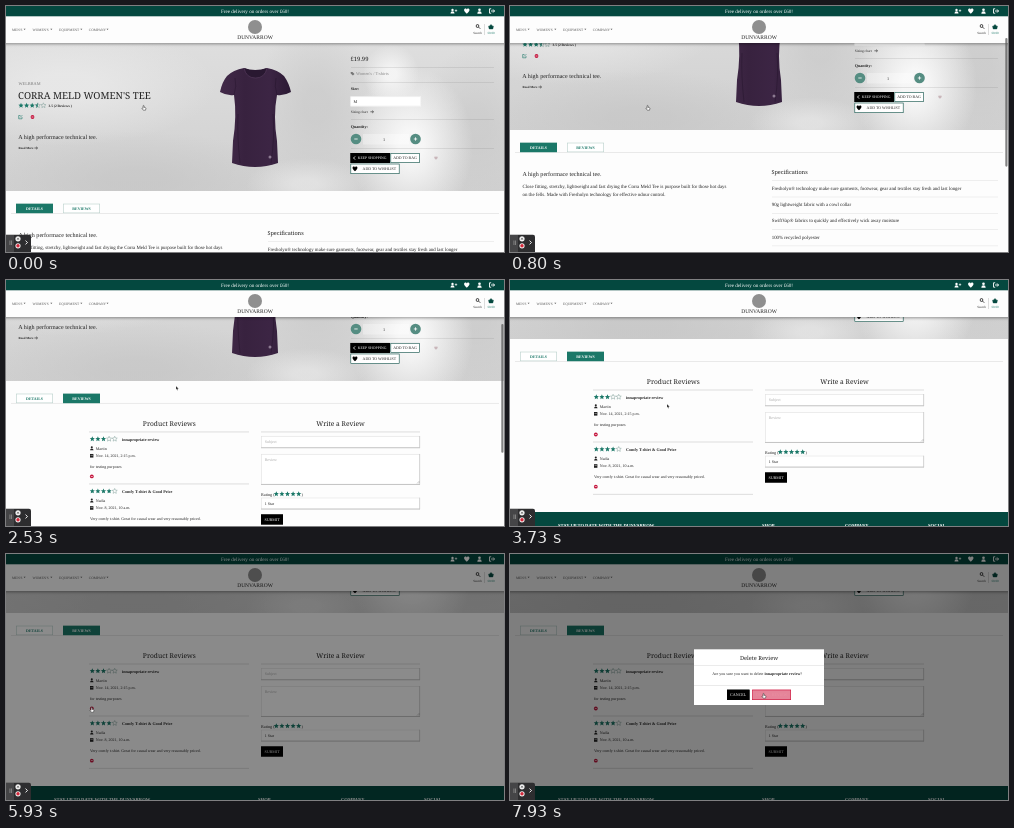
These frames come from a looping animation (498 px wide and 246 px high, 8 s). An HTML page with a canvas:

```html
<!DOCTYPE html>
<html lang="en">
<head>
<meta charset="utf-8">
<title>Product page</title>
<style>
html, body { margin: 0; width: 100%; height: 100%; overflow: hidden; background: #fff; }
canvas { display: block; width: 498px; height: 246px; }
</style>
</head>
<body>
<canvas id="stage"></canvas>
<script>
const W = 498, H = 246, LOOP = 8000, STEP = 1000 / 15;
const PAGE_HEIGHT = 470, REVIEWS_TOP = 126;
const GREEN = '#04483f', TEAL = '#1b7868', RED = '#c4143c', INK = '#222', RULE = '#d9d9d9';
const BODY = '"Liberation Serif", serif', HEAD = '"Noto Serif", serif';

const canvas = document.getElementById('stage');
const ctx = canvas.getContext('2d');
const dpr = window.devicePixelRatio || 1;
canvas.width = W * dpr;
canvas.height = H * dpr;
ctx.textRendering = 'geometricPrecision';

// Keyframes: [time, value, ...]
const SCROLL = [[33, 0], [330, 29], [800, 61], [1130, 70], [2430, 70], [2533, 84], [2870, 119], [3130, 126]];
const CURSOR = [[930, 138, 102], [1530, 76, 133], [1800, 76, 133], [2200, 171, 108], [3330, 171, 108],
  [3730, 158, 126], [4200, 150, 132], [4930, 86, 156], [7330, 86, 156], [7860, 254, 142]];
const SCROLLBAR = [[33, 0], [67, 1], [1330, 1], [1600, 0], [2430, 0], [2467, 1], [3260, 1], [3530, 0]];
const TAB_TIME = 1800, HOVER_TIME = 7860;

const clamp = v => Math.max(0, Math.min(1, v));
const smooth = v => v * v * (3 - 2 * v);
const ramp = (t, from, to) => clamp((t - from) / (to - from));

function track(keys, t, ease = v => v) {
  if (t <= keys[0][0]) return keys[0].slice(1);
  for (let i = 1; i < keys.length; i++) {
    const a = keys[i - 1], b = keys[i];
    if (t <= b[0]) {
      const k = ease(ramp(t, a[0], b[0]));
      return a.slice(1).map((v, j) => v + (b[j + 1] - v) * k);
    }
  }
  return keys[keys.length - 1].slice(1);
}

function text(s, x, y, size, { color = INK, font = BODY, weight = 400, align = 'left' } = {}) {
  ctx.font = `${weight} ${size}px ${font}`;
  ctx.textAlign = align;
  ctx.fillStyle = color;
  ctx.fillText(s, x, y);
}

function rect(x, y, w, h, fill, stroke) {
  if (fill) { ctx.fillStyle = fill; ctx.fillRect(x, y, w, h); }
  if (stroke) {
    ctx.strokeStyle = stroke;
    ctx.lineWidth = 0.6;
    ctx.strokeRect(x + 0.3, y + 0.3, w - 0.6, h - 0.6);
  }
}

function disc(x, y, r, color) {
  ctx.fillStyle = color;
  ctx.beginPath();
  ctx.arc(x, y, r, 0, 7);
  ctx.fill();
}

const rule = (x1, x2, y, color = RULE) => rect(x1, y, x2 - x1, 0.6, color);

function shape(d, fill, stroke, width = 0.6, x = 0, y = 0, scale = 1) {
  ctx.save();
  ctx.translate(x, y);
  ctx.scale(scale, scale);
  const path = new Path2D(d);
  if (fill) { ctx.fillStyle = fill; ctx.fill(path); }
  if (stroke) { ctx.strokeStyle = stroke; ctx.lineWidth = width; ctx.stroke(path); }
  ctx.restore();
}

function star(x, y, r, color, filled = true) {
  ctx.beginPath();
  for (let i = 0; i < 10; i++) {
    const a = i * Math.PI / 5 - Math.PI / 2, d = i % 2 ? r * 0.46 : r;
    ctx.lineTo(x + d * Math.cos(a), y + d * Math.sin(a));
  }
  ctx.closePath();
  ctx.fillStyle = ctx.strokeStyle = color;
  ctx.lineWidth = 0.5;
  filled ? ctx.fill() : ctx.stroke();
}

function stars(x, y, score) {
  for (let i = 0; i < 5; i++) {
    const cx = x + i * 5.6, full = score >= i + 1;
    star(cx, y, 2.7, full ? TEAL : '#7d9c96', full);
    if (score === i + 0.5) {
      ctx.save();
      ctx.beginPath();
      ctx.rect(cx - 3, y - 3, 3, 6);
      ctx.clip();
      star(cx, y, 2.7, TEAL);
      ctx.restore();
    }
  }
}

const heart = (x, y, s, c) => shape('M0 2.4C-4 -.4 -2.2 -2.6 -.9 -2.2Q-.2 -2 0 -1.3Q.2 -2 .9 -2.2C2.2 -2.6 4 -.4 0 2.4Z', c, null, 0, x, y, s);
const arrow = (x, y) => shape('M-1.6 0H1.4M.2 -1.2L1.5 0L.2 1.2', null, INK, 0.6, x, y);

function person(x, y, s, color) {
  disc(x, y - 1.1 * s, 1.2 * s, color);
  shape('M-2 2.4Q-2 .3 0 .3Q2 .3 2 2.4Z', color, null, 0, x, y, s);
}

function removeIcon(x, y) {
  disc(x, y, 1.9, RED);
  rect(x - 1, y - 0.3, 2, 0.6, '#fff');
}

function button(label, x, y, w, h, textX, { fill = '#000', border = fill, color = '#fff', size = 3.9 } = {}) {
  rect(x, y, w, h, fill, border);
  text(label, textX, y + h / 2 + 1.3, size, { color });
}

function softBlob(x, y, rx, ry, rgb, alpha) {
  ctx.save();
  ctx.translate(x, y);
  ctx.scale(rx, ry);
  const g = ctx.createRadialGradient(0, 0, 0.2, 0, 0, 1);
  g.addColorStop(0, `rgba(${rgb},${alpha})`);
  g.addColorStop(1, `rgba(${rgb},0)`);
  disc(0, 0, 1, g);
  ctx.restore();
}

function drawHeroPhoto() {
  ctx.save();
  ctx.beginPath();
  ctx.rect(0, 30, W, 155);
  ctx.clip();
  const g = ctx.createLinearGradient(0, 37, 0, 185);
  g.addColorStop(0, '#dedede');
  g.addColorStop(1, '#d0d0d0');
  rect(0, 30, W, 155, g);
  softBlob(60, 80, 150, 60, '236,236,236', 0.7);
  softBlob(130, 175, 150, 50, '196,196,196', 0.6);
  softBlob(310, 100, 60, 90, '202,202,202', 0.7);
  softBlob(470, 120, 60, 80, '200,200,200', 0.6);
  softBlob(405, 140, 62, 80, '250,250,250', 0.9);
  softBlob(385, 68, 28, 30, '246,246,246', 0.9);
  softBlob(300, 178, 60, 26, '232,232,232', 0.7);
  ctx.restore();
}

function drawTee() {
  const g = ctx.createLinearGradient(214, 0, 285, 0);
  g.addColorStop(0, '#422a49');
  g.addColorStop(0.35, '#38223f');
  g.addColorStop(0.7, '#3c2544');
  g.addColorStop(1, '#2b1933');
  shape('M238 62Q249 67 261 62Q272 64 278 70Q283 77 285 86Q278 90 271 89Q267 110 271 135L272 157Q249 165 226 157L227 135Q231 110 228 89Q221 90 214 86Q216 76 221 70Q227 64 238 62Z', g);
  shape('M238 62Q249 66 261 62Q259 72 249.500 72Q240 72 238 62Z', '#291831');
  shape('M238 62Q240 72 249.500 72Q259 72 261 62', null, '#543a5b', 0.7);
  shape('M229 72Q231 80 228 89M270 72Q268 80 271 89M232 108Q231 130 234 157M267 108Q269 130 265 157', null, 'rgba(20,8,26,.45)', 0.6);
  disc(264, 151, 1.5, '#8c7a91');
}

function drawHero() {
  drawHeroPhoto();
  drawTee();
  text('WELBRAM', 12.5, 79, 4.3, { color: '#777' });
  text("CORRA MELD WOMEN'S TEE", 12, 93, 9.63, { font: HEAD });
  stars(15, 99.5, 3.5);
  text('3.5 (2 Reviews )', 42.5, 101.3, 3.5, { weight: 700 });
  shape('M1.5 0V1.8H-1.800V-1.500H0M-.5 .5L1.800 -1.800', null, TEAL, 0.6, 14.5, 111);
  removeIcon(26.5, 111);
  text('A high performace technical tee.', 12.3, 133, 6.07);
  text('Read More', 12.5, 143, 3.1, { weight: 700 });
  arrow(30, 142);

  text('£19.99', 344.5, 54.7, 5.9, { font: HEAD });
  [61, 76, 113, 142].forEach(y => rule(345, 488, y, 'rgba(120,120,120,.28)'));
  shape('M-1.800 -1.600H0L2 .4L.4 2L-1.800 0Z', '#777', null, 0, 346.5, 67.5);
  text("Women's / T-shirts", 350, 69, 4.4, { color: '#888' });
  text('Size:', 344.8, 84, 4, { weight: 700 });
  rect(344.5, 90.5, 70.5, 9.8, '#fff', '#eee');
  text('M', 347.5, 97, 4.2);
  text('Sizing chart', 344.8, 107, 3.5);
  arrow(366, 105.8);
  text('Quantity:', 344.8, 122, 4.1, { weight: 700 });
  rect(357, 128, 46, 10.5, 'rgba(255,255,255,.3)');
  text('1', 377, 134.8, 4.2);
  [350, 409.5].forEach(x => { disc(x, 133, 5.3, '#558d82'); rect(x - 1.7, 132.6, 3.4, 0.8, '#fff'); });
  rect(409.1, 131.3, 0.8, 3.4, '#fff');
  button('KEEP SHOPPING', 344.5, 147, 39.5, 10, 351.7, { size: 3.8 });
  shape('M.8 -1.600L-.8 0L.8 1.600', null, '#fff', 0.8, 348.3, 152);
  const outline = { fill: '#fff', border: GREEN, color: INK };
  button('ADD TO BAG', 384.5, 147, 29.5, 10, 387.2, outline);
  button('ADD TO WISHLIST', 344.5, 157.7, 49, 10.3, 356.6, outline);
  heart(349, 162.8, 1, '#000');
  heart(430, 152, 0.7, '#c9b6ba');
}

function drawTabs(reviews) {
  rule(5, 493, 207, '#ddd');
  [['DETAILS', 10, 1 - reviews], ['REVIEWS', 57, reviews]].forEach(([label, x, on]) => {
    rect(x, 197.7, 37, 9.5, '#fff', '#b8cfca');
    ctx.globalAlpha = on;
    rect(x, 197.7, 37, 9.5, TEAL);
    ctx.globalAlpha = 1;
    text(label, x + 18.5, 203.7, 3.9, { weight: 700, align: 'center', color: on > 0.5 ? '#fff' : TEAL });
  });
}

function drawDetails() {
  text('A high performace technical tee.', 12.5, 230.7, 6.07);
  text('Close fitting, stretchy, lightweight and fast drying the Corra Meld Tee is purpose built for those hot days', 12.5, 243, 4.9);
  text('on the fells. Made with Fresholyn technology for effective odour control.', 12.5, 250.5, 4.9);
  text('Specifications', 261.5, 229, 5.5, { font: HEAD, weight: 500 });
  [
    'Fresholyn® technology make sure garments, footwear, gear and textiles stay fresh and last longer',
    '90g lightweight fabric with a cowl collar',
    'SwiftVap® fabrics to quickly and effectively wick away moisture',
    '100% recycled polyester'
  ].forEach((line, i) => {
    const y = 244.6 + i * 16.3;
    rule(262, 488, y - 9.2, '#e4e4e4');
    text(line, 261.7, y, 4.87);
  });
  rule(262, 488, 300.6, '#e4e4e4');
}

function drawReview(y, score, title, name, date, comment) {
  stars(86.3, y, score);
  text(title, 116, y + 1.6, 4.15, { weight: 700 });
  person(85.8, y + 9.3, 0.85, INK);
  text(name, 89.8, y + 11, 4);
  rect(84, y + 15, 3.4, 3.6, INK);
  rect(84.5, y + 16, 2.4, 0.4, '#fff');
  text(date, 89.8, y + 18, 4);
  text(comment, 84, y + 28.6, 4);
  removeIcon(85.8, y + 37.5);
  rule(83, 243, y + 44.7, '#c8c8c8');
}

function field(y, h, label, color) {
  rect(255, y, 159, h, '#fff', '#e0e0e0');
  rule(255, 414, y + h - 0.4, '#aaa');
  rect(413.5, y, 0.6, h, '#c4c4c4');
  text(label, 258.7, y + 7.2, 4, { color });
}

function drawReviews() {
  ctx.save();
  ctx.translate(0, REVIEWS_TOP);
  const heading = { font: HEAD, align: 'center' };
  text('Product Reviews', 163.3, 104, 6.67, heading);
  text('Write a Review', 334.5, 104, 6.67, heading);
  rule(83, 243, 109.7, '#c8c8c8');
  rule(255, 414, 109.7, '#c8c8c8');
  drawReview(117, 3, 'innapropriate review', 'Martin', 'Nov. 14, 2021, 2:15 p.m.', 'for testing purposes');
  drawReview(169.2, 4, 'Comfy T-shirt & Good Price', 'Nadia', 'Nov. 8, 2021, 10 a.m.',
    'Very comfy t-shirt. Great for casual wear and very reasonably priced.');
  field(114, 12, 'Subject', '#aaa');
  field(132, 30.5, 'Review', '#aaa');
  shape('M411 161.500L413.500 159M412.300 161.500L413.500 160.300', null, '#888', 0.4);
  text('Rating (', 255, 173.6, 4.2);
  stars(270.3, 172, 5);
  text(')', 295.6, 173.6, 4.2);
  field(175.7, 11.5, '1 Star', INK);
  button('SUBMIT', 255, 192.5, 22, 10, 258.5, { size: 4 });
  rect(0, 232, W, 120, GREEN);
  [['STAY UP TO DATE WITH THE DUNVARROW', 48], ['SHOP', 252], ['COMPANY', 335], ['SOCIAL', 418]]
    .forEach(([label, x]) => text(label, x, 247, 4.6, { color: '#fff', weight: 700 }));
  ctx.restore();
}

function drawHeader() {
  ctx.save();
  ctx.shadowColor = 'rgba(0,0,0,.4)';
  ctx.shadowBlur = 3 * dpr;
  ctx.shadowOffsetY = dpr;
  rect(-5, 0, W + 10, 37, '#fdfdfd');
  ctx.restore();
  rect(0, 0, W, 10.3, GREEN);
  text('Free delivery on orders over £60!', 249, 7, 5.07, { color: '#fff', align: 'center' });
  person(446.5, 5, 1, '#fff');
  shape('M0 -1.200V1.200M-1.200 0H1.200', null, '#fff', 0.7, 450, 4.6);
  heart(460.8, 5, 1.1, '#fff');
  person(473.5, 5, 1.1, '#fff');
  shape('M-.8 -2.200H-2.500V2.200H-.8M-1 0H2.400M1 -1.600L2.600 0L1 1.600', null, '#fff', 0.9, 486, 5);

  [["MEN'S", 6, 18.6], ["WOMEN'S", 26.5, 45.3], ['EQUIPMENT', 53, 75.3], ['COMPANY', 82.8, 101.5]].forEach(([label, x, caret]) => {
    text(label, x, 24.6, 3.5, { color: '#555' });
    shape('M-1 -.5H1L0 .7Z', '#555', null, 0, caret, 23.3);
  });
  disc(249, 21, 7, '#8f8f8f');
  text('DUNVARROW', 249, 33, 5.5, { align: 'center', weight: 500 });
  disc(471.5, 20, 1.8, INK);
  disc(471.5, 20, 1, '#fdfdfd');
  shape('M472.700 21.200L474.200 22.700', null, INK, 0.9);
  text('Search', 471.5, 27.6, 3.2, { align: 'center' });
  rect(478.3, 18, 0.5, 11, '#bbb');
  shape('M-2.400 -.5H2.400L1.800 2.200H-1.800ZM-1.500 -.5L0 -2.200L1.500 -.5', GREEN, GREEN, 0.5, 485, 20.7);
  text('£0.00', 485, 27.6, 3.2, { align: 'center', color: TEAL });
}

function mix(a, b, k) {
  return `rgb(${a.map((v, i) => Math.round(v + (b[i] - v) * k)).join(',')})`;
}

function drawModal(t) {
  const shade = ramp(t, 5770, 5950), show = ramp(t, 5950, 6130);
  if (!shade) return;
  rect(0, 0, W, H, `rgba(0,0,0,${shade * 0.5})`);
  if (!show) return;
  ctx.save();
  ctx.globalAlpha = show;
  const settle = 1 - ramp(t, 5950, 6270);
  ctx.translate(0, -13 * settle * settle);
  rect(184, 95.3, 130, 55.7, '#fff');
  text('Delete Review', 249, 105.5, 5.65, { font: HEAD, align: 'center' });
  rule(184, 314, 111.3, '#ddd');
  const lead = 'Are you sure you want to delete ';
  text(lead, 202.3, 120.6, 4);
  let x = 202.3 + ctx.measureText(lead).width;
  text('innapropriate review', x, 120.6, 4, { weight: 700 });
  x += ctx.measureText('innapropriate review').width;
  text('?', x, 120.6, 4);
  rule(184, 314, 131, '#ddd');
  button('CANCEL', 217, 135.7, 22.5, 10.3, 220, { size: 4.1 });
  const white = [255, 255, 255], crimson = [206, 20, 60], hover = ramp(t, HOVER_TIME, HOVER_TIME + 140);
  button('DELETE REVIEW', 242.3, 135.7, 38.7, 10.3, 245.7, {
    fill: mix(white, crimson, hover), border: mix(crimson, crimson, 0), color: mix(crimson, white, hover), size: 4
  });
  ctx.restore();
}

function drawWidget() {
  ctx.fillStyle = '#2d2d2f';
  ctx.beginPath();
  ctx.roundRect(-3, 228.7, 28, 20, 2);
  ctx.fill();
  rect(0, 229, 8, 17, '#454547');
  rect(3.6, 234.5, 0.7, 4.5, '#999');
  rect(5.2, 234.5, 0.7, 4.5, '#999');
  disc(12, 232.8, 2.6, '#f2f2f2');
  shape('M-1 -1L1 1M1 -1L-1 1', null, '#333', 0.6, 12, 232.8);
  disc(12, 239.8, 2.6, '#f2f2f2');
  disc(12, 239.8, 1.7, '#d3273a');
  shape('M-1 -1.900L1 0L-1 1.900', null, '#fff', 0.9, 20.5, 236.5);
}

function drawCursor(t) {
  const [x, y] = track(CURSOR, t, smooth);
  const hand = t < 930 || (t > 1500 && t < 1830) || (t > 4900 && t < 6000) || t > 7800;
  if (hand) {
    shape('M-.9 -2.300Q-.3 -2.900 .1 -2.200V-.7L1.700 -.2Q2 0 1.900 .6L1.500 2.200H-.7L-2 .4Q-1.800 -.3 -.9 .3Z', '#fff', '#222', 0.5, x, y);
  } else {
    shape('M-1 -2V1.800L-.1 1L.5 2.400L1.100 2.100L.5 .8H1.700Z', '#111', '#fff', 0.3, x, y);
  }
}

function render(time) {
  const t = Math.floor((time % LOOP + 7) / STEP) * STEP % LOOP;
  const [scroll] = track(SCROLL, t);
  const [barAlpha] = track(SCROLLBAR, t);
  const tab = ramp(t, TAB_TIME - 40, TAB_TIME + 100);

  ctx.setTransform(dpr, 0, 0, dpr, 0, 0);
  rect(0, 0, W, H, '#fdfdfd');
  ctx.save();
  ctx.translate(0, -scroll);
  drawHero();
  drawTabs(tab);
  if (!tab) {
    drawDetails();
  } else {
    ctx.globalAlpha = tab;
    drawReviews();
  }
  ctx.restore();

  drawHeader();
  if (barAlpha) {
    ctx.fillStyle = `rgba(90,90,90,${barAlpha * 0.75})`;
    ctx.beginPath();
    ctx.roundRect(495.3, scroll * H / PAGE_HEIGHT, 2.2, H * H / PAGE_HEIGHT, 1.1);
    ctx.fill();
  }
  drawModal(t);
  drawWidget();
  drawCursor(t);
}

const start = performance.now();
function tick() {
  render(performance.now() - start);
  requestAnimationFrame(tick);
}
tick();
</script>
</body>
</html>
```
